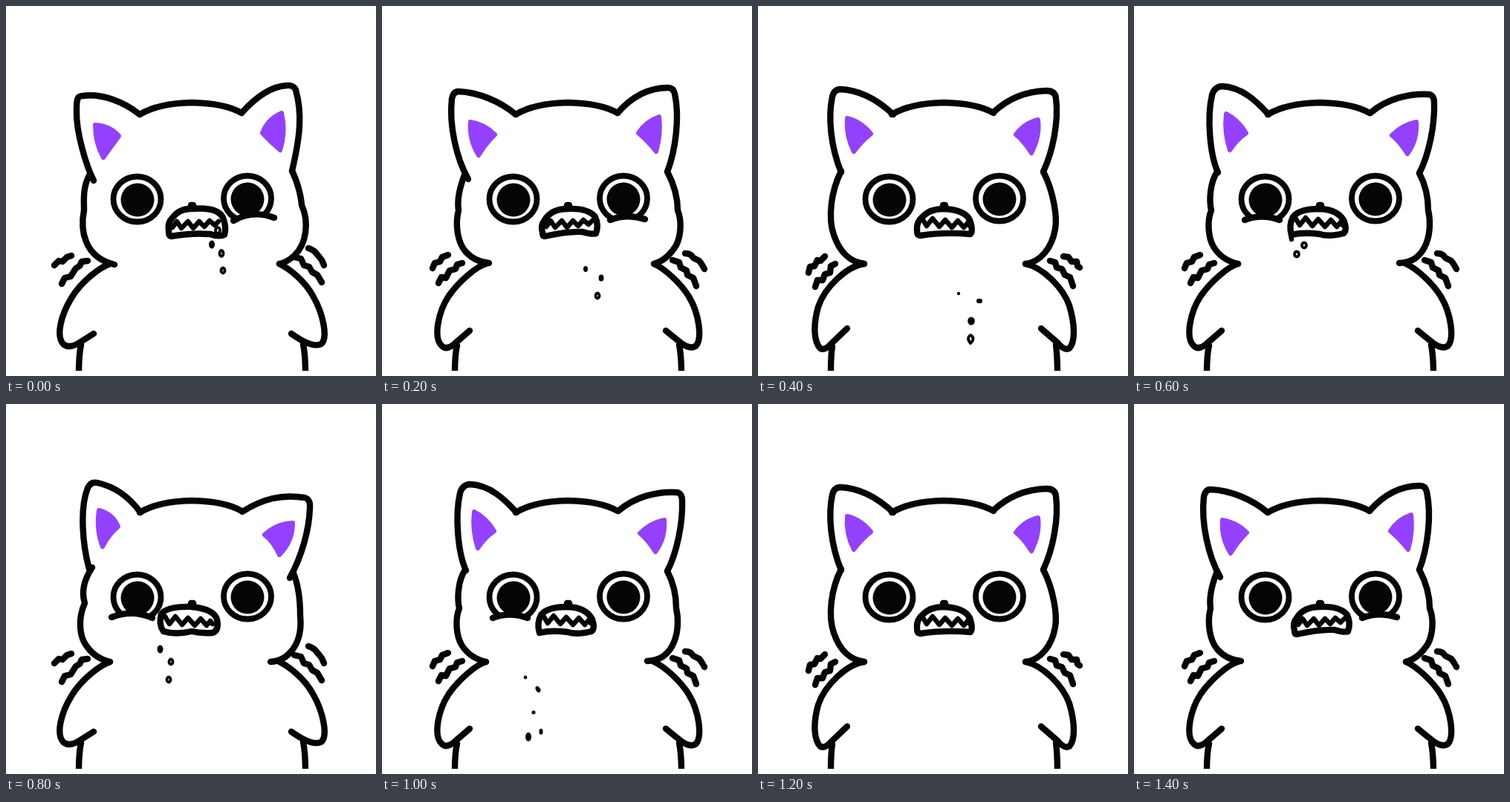
Write an HTML page without scripts that moves like this. It is 498 by 498 pixels and loops after 1600 ms.

```html
<!DOCTYPE html>
<html lang="en">
<head>
<meta charset="utf-8">
<title>Shivering cat</title>
<style>
  html, body { margin: 0; width: 100%; height: 100%; overflow: hidden; background: #fff; }
  svg { display: block; width: 100vw; height: 100vh; }
  .ink { fill: none; stroke: #050505; stroke-width: 8.4; stroke-linecap: round; stroke-linejoin: round; }
  .thin { stroke-width: 6.5; }
  .eye { stroke-width: 7.8; }
  .dot { fill: #050505; stroke: none; }
  .ring { fill: #fff; stroke-width: 3.8; }
  .white { fill: #fff; }
  .mask { fill: #fff; stroke: none; }
  .ear { fill: #9440ff; stroke: #9440ff; stroke-width: 6; }
  /* eight poses, 200 ms each */
  .pose { visibility: hidden; animation: show 1.6s step-end infinite; animation-delay: calc(var(--n) * .2s - 1.6s); }
  @keyframes show { 0% { visibility: visible; } 12.5%, 100% { visibility: hidden; } }
</style>
</head>
<body>
<svg viewBox="0 0 498 498">
  <defs>
    <clipPath id="floor"><path d="M0 0H498V491H0Z"/></clipPath>
    <path id="teethR" class="thin" d="M221 297l6-8 6 9 9-9 7 9 8-9 7 7 7-8 7 6 5-5"/>
    <path id="teethL" class="thin" d="M217 285l6 10 8-10 9 11 8-9 9 10 8-9 8 9 5-6 3 4"/>

    <!-- arms, legs and shiver marks -->
    <g id="bodyA">
      <path d="M140 347C126 352 102 370 88 393C74 416 67 444 77 455Q85 462 99 453Q110 446 118 441M101 456Q98 470 98 495"/>
      <path d="M368 347C382 354 402 370 413 390C427 414 434 448 424 455Q412 461 384 441M400 455Q403 470 403 495"/>
      <path d="M65 349l6-6 5 1 6-6 6-2M75 374l4-8 8-2 7-11 5-3 3-6 8-1M407 326Q413 328 416 331L421 337 425 342 428 349M388 338l9 2 4 9 7 2 4 7 7 4 6 10"/>
    </g>
    <g id="bodyB">
      <path d="M140 347C128 350 104 370 90 390C76 411 68 447 81 458Q87 463 96 456L118 437M101 457Q98 470 98 495"/>
      <path d="M366 347C380 353 402 373 413 391C427 414 431 447 423 457Q416 463 403 454L382 437M400 456Q403 472 403 495"/>
      <path d="M68 353l3-7 7-2 3-6 8-3M76 373l4-8 6 1 5-10 8-2 2-6 7-2M408 333Q416 333 419 339L427 343 430 347 434 354M391 342l9 3 2 7 8 4 1 6 8 4 4 11"/>
    </g>
    <g id="bodyC">
      <path d="M143 347C120 350 90 378 81 405C74 430 75 452 84 461Q90 464 98 455L120 434M100 458Q98 470 98 495"/>
      <path d="M360 347C383 352 410 378 419 403C427 430 427 452 419 461Q412 464 404 454L381 434M401 456Q403 472 403 495"/>
      <path d="M68 359l2-8 6-1 4-8 4 1 6-6M77 378l3-9 7 0 3-8 7-2 1-9 6-3M411 337l7 1 4 6 7 0 1 6 3 2M393 343l7 2 2 7 7 2 4 8 7 3 4 12"/>
    </g>

    <!-- parts that never move -->
    <g id="face">
      <path d="M180 146Q205 131 250 130Q295 131 317 144"/>
      <ellipse class="eye" cx="176.500" cy="260" rx="32" ry="30.5"/>
      <ellipse class="eye" cx="325" cy="259" rx="32" ry="30.5"/>
      <circle class="dot" cx="177" cy="261" r="22.5"/>
      <circle class="dot" cx="325" cy="260" r="22.5"/>
      <path d="M249 268h3"/>
    </g>

    <!-- heads, from far right to far left -->
    <g id="right2">
      <use href="#face"/>
      <path d="M118 235C108 215 94 170 95 140C95 125 96 121 103 121C130 117 160 130 180 146M317 144C335 124 357 108 378 107Q387 106 390 113C399 145 396 175 385 222"/>
      <path d="M112 228C103 245 105 262 105 275C100 300 104 338 146 348M385 222C392 236 397 255 398 268C408 290 405 320 388 336Q378 345 368 347"/>
      <path class="ear" d="M120 160Q140 161 152 175Q141 190 131 204Q120 185 120 160ZM371 144Q352 152 345 171Q356 183 369 194Q377 170 371 144Z"/>
      <path class="mask" d="M305 289Q332 274 361 285V300H305Z"/>
      <path d="M306 289Q332 274 361 285"/>
      <path class="white" d="M219 303Q217 292 224 285Q234 272 250 273Q285 270 292 285Q297 297 294 308Q285 311 275 307Q250 305 222 310Q219 310 219 303Z"/>
      <use href="#teethR" x="3" y="1"/>
      <ellipse class="ring" cx="285" cy="302" rx="3" ry="4"/>
    </g>
    <g id="right1">
      <use href="#face"/>
      <path d="M116 233C100 205 90 160 94 125Q96 115 103 115C130 116 160 129 180 146M317 144C337 121 360 110 385 110Q392 110 394 118C401 150 395 195 384 223"/>
      <path d="M112 225C104 245 101 262 103 275C98 295 102 318 112 330Q124 344 144 346M384 223C393 240 398 257 398 275C404 290 402 310 396 322Q384 342 366 347"/>
      <path class="ear" d="M119 156Q138 159 152 173Q140 185 130 201Q117 180 119 156ZM373 149Q355 155 345 171Q358 182 369 196Q376 172 373 149Z"/>
      <path class="mask" d="M307 288Q330 279 354 287V300H307Z"/>
      <path d="M307 288Q330 279 354 287"/>
      <path class="white" d="M216 305Q213 295 219 288Q228 273 250 273Q278 272 287 284Q292 295 288 306Q283 308 270 304Q250 303 219 310Q216 310 216 305Z"/>
      <use href="#teethR"/>
    </g>
    <g id="middle">
      <use href="#face"/>
      <path d="M112 224C98 190 94 150 100 122Q102 113 110 112C140 113 165 130 182 146M317 143C337 124 360 115 388 114Q400 114 401 124C405 155 397 195 384 223"/>
      <path d="M112 222C98 250 94 285 102 308C110 332 125 345 143 347M384 223C398 250 403 285 400 300C396 325 380 345 360 347"/>
      <path class="ear" d="M120 151Q138 155 152 172Q139 182 129 196Q118 175 120 151ZM377 153Q359 157 347 173Q358 182 368 198Q380 175 377 153Z"/>
      <path class="white" d="M214 302Q213 290 222 283Q232 273 250 273Q278 274 285 288Q290 302 286 307Q250 304 218 309Q214 309 214 302Z"/>
      <use href="#teethL" x="4" y="1"/>
    </g>
    <g id="left1">
      <use href="#face"/>
      <path d="M113 224C102 200 98 150 105 120Q108 109 118 108C145 109 165 128 181 146M318 144C340 125 370 117 398 119Q404 121 404 130C405 160 397 200 384 225"/>
      <path d="M112 223C102 238 101 262 104 275C98 290 100 312 107 324Q118 342 140 347M384 225C393 242 396 260 396 275C402 300 396 345 357 346"/>
      <path class="ear" d="M124 145Q140 153 151 171Q138 180 129 194Q121 170 124 145ZM380 156Q361 160 347 174Q358 183 368 199Q382 180 380 156Z"/>
      <path class="mask" d="M149 288Q172 279 196 288V300H149Z"/>
      <path d="M149 288Q172 279 196 288"/>
      <path class="white" d="M212 308Q208 295 214 284Q222 273 250 273Q275 274 283 290Q287 302 282 306Q262 311 250 307Q228 304 212 308Z"/>
      <use href="#teethL"/>
    </g>
    <g id="left2">
      <use href="#face"/>
      <path d="M112 222C103 190 99 140 110 113Q114 104 123 106C150 112 168 128 181 146M318 145C345 128 370 121 402 126Q410 128 409 140C408 170 398 205 382 234"/>
      <path d="M116 220C104 238 102 255 106 268C96 290 100 312 106 322Q118 342 140 347M387 228C394 245 396 262 396 285C400 325 378 346 356 347"/>
      <path class="ear" d="M125 143Q144 148 151 165Q138 176 130 192Q121 170 125 143ZM386 160Q364 161 348 176Q360 185 368 203Q386 185 386 160Z"/>
      <path class="mask" d="M142 287Q170 276 197 288V300H142Z"/>
      <path d="M142 287Q170 276 197 288"/>
      <path class="white" d="M212 306Q205 297 209 283Q216 272 250 273Q280 276 284 290Q287 305 278 308Q262 309 250 306Q228 311 212 306Z"/>
      <use href="#teethL" x="-3" y="1"/>
    </g>
  </defs>

  <g class="ink" clip-path="url(#floor)">
    <g class="pose" style="--n:0">
      <use href="#bodyA"/><use href="#right2"/>
      <ellipse class="dot" cx="277" cy="321" rx="4" ry="5.5"/>
      <ellipse class="ring" cx="290" cy="333" rx="2.5" ry="4"/>
      <ellipse class="ring" cx="292" cy="356" rx="2.5" ry="3.5"/>
    </g>
    <g class="pose" style="--n:1">
      <use href="#bodyB"/><use href="#right1"/>
      <ellipse class="dot" cx="274" cy="354" rx="3" ry="4"/>
      <ellipse class="dot" cx="295" cy="366" rx="3.5" ry="4.5"/>
      <ellipse class="ring" cx="290" cy="390" rx="2.5" ry="3.5"/>
    </g>
    <g class="pose" style="--n:2">
      <use href="#bodyC"/><use href="#middle"/>
      <circle class="dot" cx="270" cy="387" r="2.2"/>
      <ellipse class="dot" cx="298" cy="397" rx="4" ry="3.2"/>
      <ellipse class="dot" cx="287" cy="424" rx="4.8" ry="5.5"/>
      <path class="ring" d="M286 443Q293 447 286 454Q280 447 286 443Z"/>
    </g>
    <g class="pose" style="--n:3">
      <use href="#bodyB"/><use href="#left1"/>
      <path d="M211 308l1 6" class="thin"/>
      <ellipse class="ring" cx="229" cy="322" rx="3" ry="3.5"/>
      <ellipse class="ring" cx="219" cy="334" rx="3" ry="3.5"/>
    </g>
    <g class="pose" style="--n:4">
      <use href="#bodyA"/><use href="#left2"/>
      <ellipse class="dot" cx="207.500" cy="330" rx="4" ry="5.5"/>
      <ellipse class="ring" cx="222" cy="347" rx="2.5" ry="3.5"/>
      <ellipse class="ring" cx="219" cy="371" rx="2.5" ry="3.5"/>
    </g>
    <g class="pose" style="--n:5">
      <use href="#bodyB"/><use href="#left1"/>
      <circle class="dot" cx="193" cy="368" r="2.4"/>
      <ellipse class="dot" cx="210" cy="384" rx="3" ry="4.5" transform="rotate(-30 210 384)"/>
      <circle class="dot" cx="204" cy="415" r="2.6"/>
      <ellipse class="dot" cx="214" cy="441" rx="2.6" ry="4"/>
      <ellipse class="dot" cx="197" cy="448" rx="4" ry="6"/>
    </g>
    <g class="pose" style="--n:6"><use href="#bodyC"/><use href="#middle"/></g>
    <g class="pose" style="--n:7"><use href="#bodyB"/><use href="#right1"/></g>
  </g>
</svg>
</body>
</html>
```
